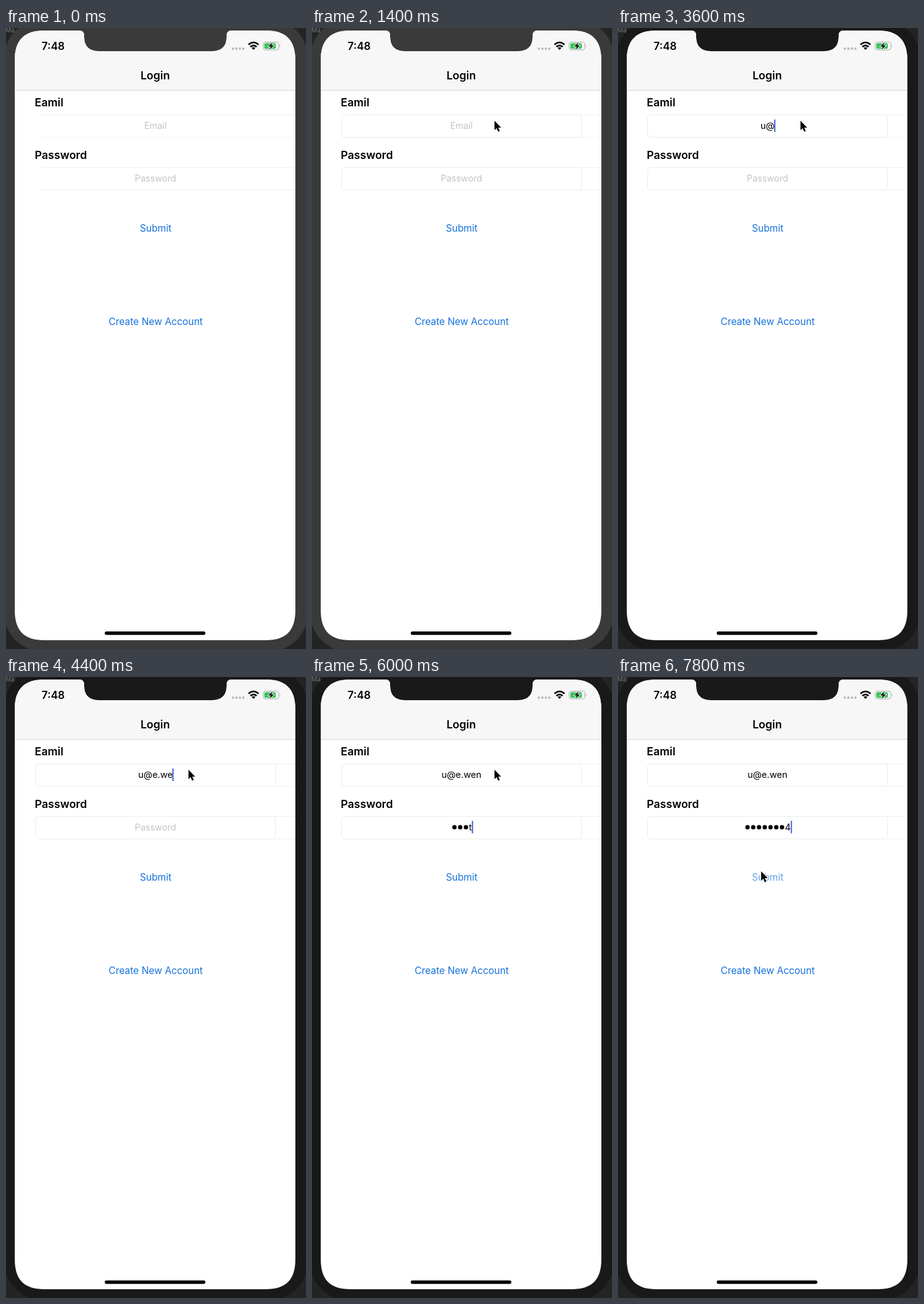
These frames come from a looping animation (480x991 px, 8 s). An HTML page:

```html
<!DOCTYPE html>
<html lang="en">
<head>
<meta charset="utf-8">
<title>Login form</title>
<style>
  html, body { margin: 0; width: 100%; height: 100%; overflow: hidden; background: #242424; }
  svg { display: block; width: 100%; height: 100%; font-family: Inter, Roboto, sans-serif; }
  .bold { font-weight: 600; font-size: 17.6px; }
  .link { font-size: 15.4px; fill: #1471dc; }
  .hint { font-size: 14.3px; fill: #c3c3c5; }
  .value { font-size: 14.5px; fill: #000; }
  .mid { text-anchor: middle; }
</style>
</head>
<body>
<svg viewBox="0 0 480 991">
  <defs>
    <clipPath id="screen">
      <path d="M62 4H117Q125 4 125 12V14Q125 37 149 37H329Q353 37 353 14V12Q353 4 361 4H415C448 4 463 19 463 52V929C463 962 448 977 415 977H62C29 977 14 962 14 929V52C14 19 29 4 62 4Z"/>
    </clipPath>
  </defs>

  <rect width="480" height="991" fill="#242424"/>
  <rect id="bezel" x="-3" y="-14" width="486" height="1009" rx="62"/>
  <text x="-1" y="7" font-size="10" fill="#777">Ma</text>

  <g clip-path="url(#screen)">
    <rect width="480" height="991" fill="#fff"/>
    <rect width="480" height="99" fill="#f7f7f7"/>
    <path d="M14 99.5H463" stroke="#d6d6d6"/>
    <path d="M57 138.5H463M57 174.5H463M57 222.5H463M57 258.5H463" stroke="#f1f1f1"/>
  </g>

  <text class="bold" x="57" y="35" style="font-size:17px">7:48</text>
  <g fill="#b9b9bb">
    <circle cx="363" cy="33" r="1.9"/><circle cx="368.6" cy="33" r="1.9"/>
    <circle cx="374.2" cy="33" r="1.9"/><circle cx="379.8" cy="33" r="1.9"/>
  </g>
  <g fill="none" stroke="#000" stroke-width="2.6">
    <path d="M388 26.6Q396 19.4 404 26.6M391 30Q396 25.6 401 30"/>
    <path d="M393 31.8Q396 29.6 399 31.8L396 35Z" fill="#000" stroke="none"/>
  </g>
  <rect x="411.5" y="22.5" width="25" height="12.5" rx="3.6" fill="#fff" stroke="#a5a5a7"/>
  <rect x="413.3" y="24.3" width="18.5" height="9" rx="2" fill="#37c45a"/>
  <path d="M438.3 26.6Q440 28.7 438.3 30.9Z" fill="#a5a5a7"/>
  <path d="M426.6 22.6L419.6 29.6H423.6L421.6 35L428.6 27.8H424.6Z" stroke="#fff" stroke-width="1.6" paint-order="stroke"/>

  <text class="bold mid" x="238.7" y="82">Login</text>
  <text class="bold" x="46" y="124.5">Eamil</text>
  <text class="bold" x="46" y="208.5">Password</text>
  <g id="boxes" fill="none" stroke="#ebebeb">
    <rect x="47.5" y="138.5" width="384" height="36" rx="5"/>
    <rect x="47.5" y="222.5" width="384" height="36" rx="5"/>
  </g>

  <text id="emailHint" class="hint mid" x="239.2" y="161">Email</text>
  <text id="email" class="value mid" x="239.2" y="161"></text>
  <text id="passwordHint" class="hint mid" x="239.2" y="245">Password</text>
  <g id="dots"></g>
  <text id="lastKey" class="value" y="245"></text>
  <rect id="caret" width="2" height="20" fill="#3f63d8"/>

  <text id="submit" class="link mid" x="239.5" y="324.5">Submit</text>
  <text class="link mid" x="239.5" y="473.5">Create New Account</text>
  <rect x="158" y="963" width="161" height="5.4" rx="2.7"/>
  <path id="pointer" d="M0 0V15L3.4 11.8L5.8 17.4L8.4 16.3L6 10.9H10.6Z" stroke="#fff" stroke-width="1.6" paint-order="stroke"/>
</svg>
<script>
const LOOP = 8000, STEP = 200, CENTER = 239.5, DOT_PITCH = 9.2;
const EMAIL = 'u@e.wen', PASSWORD = 'test1234';
const EMAIL_KEYS = [3200, 3600, 3800, 4000, 4200, 4400, 4600];
const PASSWORD_KEYS = [5200, 5400, 5800, 6000, 6200, 6400, 6600, 6800];
const FOCUS = 1800, NEXT_FIELD = 4800, PRESS = 7600;

const $ = id => document.getElementById(id);
const show = (id, on) => $(id).setAttribute('visibility', on ? 'visible' : 'hidden');
const typed = (keys, t) => keys.filter(key => key <= t).length;

function ease(t, from, to) {
  const p = Math.min(1, Math.max(0, (t - from) / (to - from)));
  return p * p * (3 - 2 * p);
}

function drawEmail(t) {
  const text = EMAIL.slice(0, typed(EMAIL_KEYS, t));
  $('email').textContent = text;
  show('emailHint', !text);
  return text ? CENTER + $('email').getComputedTextLength() / 2 - 1 : 218;
}

function drawPassword(t) {
  const count = typed(PASSWORD_KEYS, t), hidden = Math.max(0, count - 1);
  const lastKey = $('lastKey');
  lastKey.textContent = count ? PASSWORD[count - 1] : '';
  const width = hidden * DOT_PITCH + (count ? lastKey.getComputedTextLength() : 0);
  const left = CENTER - width / 2;
  lastKey.setAttribute('x', left + hidden * DOT_PITCH);
  $('dots').innerHTML = Array.from({ length: hidden }, (_, i) =>
    `<circle cx="${left + (i + 0.5) * DOT_PITCH}" cy="239.8" r="3.5"/>`).join('');
  show('passwordHint', !count);
  return count ? left + width : 203;
}

function drawPointer(t) {
  const enter = ease(t, 600, 1200), leave = ease(t, 7000, 7400);
  const x = 380 - 88 * enter - 63 * leave;
  const y = 260 - 112 * enter + 162 * leave;
  $('pointer').setAttribute('transform', `translate(${x} ${y})`);
  show('pointer', t >= 800);
}

function render(t) {
  $('bezel').setAttribute('fill', t < FOCUS ? '#3a3a3a' : '#191919');
  show('boxes', t >= STEP);
  const emailEnd = drawEmail(t), passwordEnd = drawPassword(t);
  const inPassword = t >= NEXT_FIELD;
  $('caret').setAttribute('x', inPassword ? passwordEnd : emailEnd);
  $('caret').setAttribute('y', inPassword ? 229.5 : 146);
  const blinkOff = (t >= 2600 && t < 3000) || (t >= 7200 && t < 7600);
  show('caret', t >= FOCUS && !blinkOff);
  $('submit').setAttribute('opacity', t >= PRESS ? 0.65 : 1);
  drawPointer(t);
}

const start = performance.now();
function tick() {
  const t = (performance.now() - start) % LOOP;
  render(Math.floor(t / STEP) * STEP);
  requestAnimationFrame(tick);
}
tick();
</script>
</body>
</html>
```
